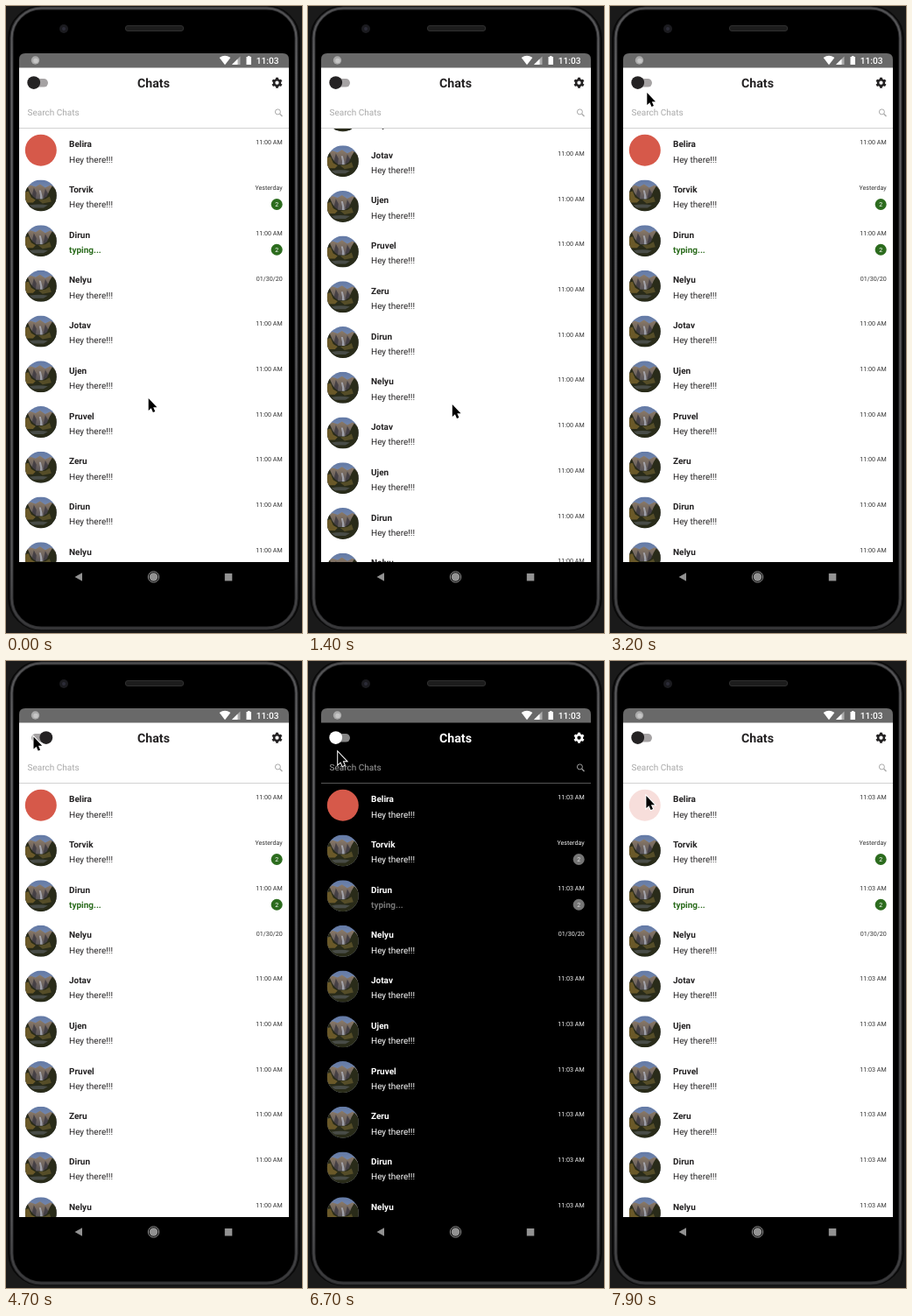
Animation, 338 px wide and 716 px high, one loop 8000 ms. Source, as an HTML page:

```html
<!DOCTYPE html>
<html lang="en">
<head>
<meta charset="utf-8">
<title>Chats</title>
<style>
  html, body { margin: 0; width: 100%; height: 100%; overflow: hidden; background: #1a1a1a; }
  svg { display: block; width: 338px; height: 716px; font: 10px Roboto, sans-serif;
        text-rendering: geometricPrecision; }
  #app { --bg: #fff; --ink: #242223; --time: #333; --hint: #a9a9a9; --line: #d2d2d2;
         --accent: #2c6c1e; --count: #fff; --track: #a5a2a3; }
  #app.dark { --bg: #000; --ink: #fff; --time: #f2f2f2; --hint: #a0a0a0; --line: #555;
              --accent: #757575; --count: #ddd; --track: #858585; }
  .bold { font-weight: 700; }
  .ink { fill: var(--ink); }
  .hint { fill: var(--hint); }
  .accent { fill: var(--accent); }
  .time { fill: var(--time); font-size: 7.15px; text-anchor: end; }
  .count { fill: var(--count); font-size: 7px; text-anchor: middle; }
</style>
</head>
<body>
<svg viewBox="0 0 338 716">
  <defs>
    <linearGradient id="rim" x2="0" y2="1">
      <stop stop-color="#505052"/><stop offset=".1" stop-color="#626264"/>
      <stop offset=".9" stop-color="#545456"/><stop offset="1" stop-color="#38383a"/>
    </linearGradient>
    <linearGradient id="sky" x2="0" y2="1">
      <stop stop-color="#6279a6"/><stop offset="1" stop-color="#a3abb8"/>
    </linearGradient>
    <linearGradient id="cliff" x2="0" y2="1">
      <stop stop-color="#8c7a66"/><stop offset="1" stop-color="#4b4b58"/>
    </linearGradient>
    <clipPath id="list"><path d="M15 140H323V635H15Z"/></clipPath>
    <clipPath id="disc"><circle r="18"/></clipPath>
    <g id="photo" clip-path="url(#disc)">
      <path d="M-18-18H18V18H-18Z" fill="url(#sky)"/>
      <path d="M-18-8L-12-12-6-10-1-13 5-9 11-12 18-8V9H-18Z" fill="url(#cliff)"/>
      <path d="M-8-9L-5-3-6 5-11 4ZM5-8L9-1 7 5 3 2Z" fill="#38353c" opacity=".75"/>
      <path d="M-2-6Q0 0-1 5L2 6Q2 0 0-6Z" fill="#b9bec9" opacity=".7"/>
      <path d="M-18-7L-15-10-12-3-9 1-5 4 2 4 7 1 10-6 13-11 18-5V18H-18Z" fill="#292b19"/>
      <path d="M-18-4L-14-5-11 2-6 5-9 8-18 8Z" fill="#80692f" opacity=".75"/>
      <path d="M-3 5L5 4 10 1 12 7 2 9Z" fill="#6d6030" opacity=".65"/>
      <path d="M-13 11Q-3 9 8 11L3 14H-9Z" fill="#565b5c" opacity=".7"/>
    </g>
  </defs>

  <rect width="338" height="716" fill="#1a1a1a"/>
  <rect x="4" y="1.500" width="330" height="710" rx="36" fill="#000" stroke="#090909" stroke-width="4"/>
  <rect x="6.500" y="2.500" width="325" height="708" rx="34" fill="#000" stroke="#2b2b2d" stroke-width="4"/>
  <rect x="6.500" y="2.500" width="325" height="708" rx="34" fill="none" stroke="url(#rim)" stroke-width="2"/>
  <circle cx="66" cy="26" r="5" fill="#1b1b1f"/>
  <circle cx="66" cy="26" r="2" fill="#2c2c38"/>
  <rect x="136.500" y="22.500" width="66" height="6" rx="2.500" fill="#1c1c1c" stroke="#303030"/>

  <g id="app">
    <path d="M15 70H323V635H15Z" fill="var(--bg)"/>
    <g clip-path="url(#list)"><g id="rows"></g></g>
    <path d="M15 139.500H323" stroke="var(--line)"/>
    <text class="ink bold" x="168.500" y="93" font-size="14.200" text-anchor="middle">Chats</text>
    <rect x="29" y="83" width="19" height="9.600" rx="4.800" fill="var(--track)"/>
    <circle id="knob" class="ink" cy="87.600" r="7.400"/>
    <g transform="translate(309.500 87.700)" fill="none" stroke="var(--ink)">
      <circle r="3.400" stroke-width="2.600"/>
      <g id="teeth" stroke-width="3"></g>
    </g>
    <text class="hint" x="24.500" y="125.200">Search Chats</text>
    <path d="M312.700 123.200L315.500 126" stroke="var(--hint)" stroke-width="1.300"/>
    <circle cx="310.400" cy="120.900" r="3" fill="none" stroke="var(--hint)"/>
  </g>

  <path d="M15 70.500V61Q15 54 22 54H316Q323 54 323 61V70.500Z" fill="#696969"/>
  <circle cx="33.500" cy="62" r="4.700" fill="#aaa"/>
  <circle cx="34" cy="62.500" r="2.800" fill="#c6c6c6"/>
  <g fill="#fff">
    <path d="M243.700 59Q250 54.600 256.300 59L250 67.200Z"/>
    <path d="M258 67L267.500 57.500V67Z" opacity=".45"/>
    <path d="M258 67L264.500 60.500V67Z"/>
    <path d="M274.500 58H276V57H278.500V58H280V67H274.500Z"/>
    <text x="285.700" y="65.800" font-size="10.200" font-weight="500">11:03</text>
  </g>
  <g fill="#929292">
    <path d="M78.500 652L87 647.300V656.700Z"/>
    <circle cx="168.500" cy="652" r="4.800"/>
    <circle cx="168.500" cy="652" r="6.200" fill="none" stroke="#929292"/>
    <path d="M249.800 648H258.300V656.500H249.800Z"/>
  </g>
  <path id="cursor" d="M0 0V14L3.100 11.200 5.200 16 7.600 15 5.500 10.300H9.700Z"
        stroke="#fff" stroke-width="2" paint-order="stroke"/>
</svg>
<script>
const LOOP = 8000, PITCH = 51.72;
const DARK_AT = 4800, LIGHT_AT = 6780;
const names = ["Belira", "Torvik", "Dirun", "Nelyu", "Jotav", "Ujen", "Pruvel", "Zeru",
               "Dirun", "Nelyu", "Jotav", "Ujen", "Dirun", "Nelyu", "Jotav", "Ujen"];
const fixedTimes = { 1: "Yesterday", 3: "01/30/20" };

const scrollKeys = [[300, 0], [1350, 194.4], [1700, 194.4], [2500, 0]];
const cursorX = [[0, 162.7], [1300, 164.8], [2300, 164.8], [3100, 42.3], [3300, 42.3], [3700, 31.5],
                 [6500, 31.5], [6680, 34.2], [6780, 34.2], [7600, 41.4]];
const cursorY = [[0, 448], [1300, 455], [2300, 455], [3100, 99], [3300, 99], [3700, 86.5],
                 [6500, 86.5], [6680, 104], [6780, 104], [7200, 128], [7600, 154]];
const knobKeys = [[4480, 31.7], [4660, 45.8], [6420, 45.8], [6600, 31.7]];
const pressKeys = [[7700, 1], [7850, 0.2]];

const byId = id => document.getElementById(id);

// Eased value between [time, value] keys
function at(keys, t) {
  if (t <= keys[0][0]) return keys[0][1];
  for (let i = 1; i < keys.length; i++) {
    const [t0, a] = keys[i - 1], [t1, b] = keys[i];
    if (t < t1) {
      const p = (t - t0) / (t1 - t0);
      return a + (b - a) * p * p * (3 - 2 * p);
    }
  }
  return keys[keys.length - 1][1];
}

function row(name, i) {
  const typing = i === 2, unread = i === 1 || typing;
  const avatar = i ? '<use href="#photo" transform="translate(39.800 164.700)"/>'
                   : '<circle id="pressed" cx="39.800" cy="164.700" r="18" fill="#d6594a"/>';
  const badge = '<circle class="accent" cx="309.200" cy="174.800" r="6.500"/>' +
                '<text class="count" x="309.200" y="177.300">2</text>';
  return `<g transform="translate(0 ${i * PITCH})">${avatar}
    <text class="ink bold" x="72" y="161.300">${name}</text>
    <text class="${typing ? "accent bold" : "ink"}" x="72" y="178.500">${typing ? "typing..." : "Hey there!!!"}</text>
    <text class="time ${fixedTimes[i] ? "" : "live"}" x="315.700" y="158.400">${fixedTimes[i] || ""}</text>
    ${unread ? badge : ""}</g>`;
}

byId("rows").innerHTML = names.map(row).join("");
byId("teeth").innerHTML = [0, 60, 120, 180, 240, 300]
  .map(a => `<path d="M0-3.500V-6" transform="rotate(${a})"/>`).join("");
const liveTimes = document.querySelectorAll(".live");

function render(t) {
  byId("app").classList.toggle("dark", t >= DARK_AT && t < LIGHT_AT);
  byId("rows").setAttribute("transform", `translate(0 ${-at(scrollKeys, t)})`);
  byId("cursor").setAttribute("transform", `translate(${at(cursorX, t)} ${at(cursorY, t)})`);
  byId("knob").setAttribute("cx", at(knobKeys, t));
  byId("pressed").setAttribute("opacity", at(pressKeys, t));
  const clock = t < DARK_AT ? "11:00 AM" : "11:03 AM";
  for (const el of liveTimes) if (el.textContent !== clock) el.textContent = clock;
}

const start = performance.now();
function frame() {
  render((performance.now() - start) % LOOP);
  requestAnimationFrame(frame);
}
frame();
</script>
</body>
</html>
```
